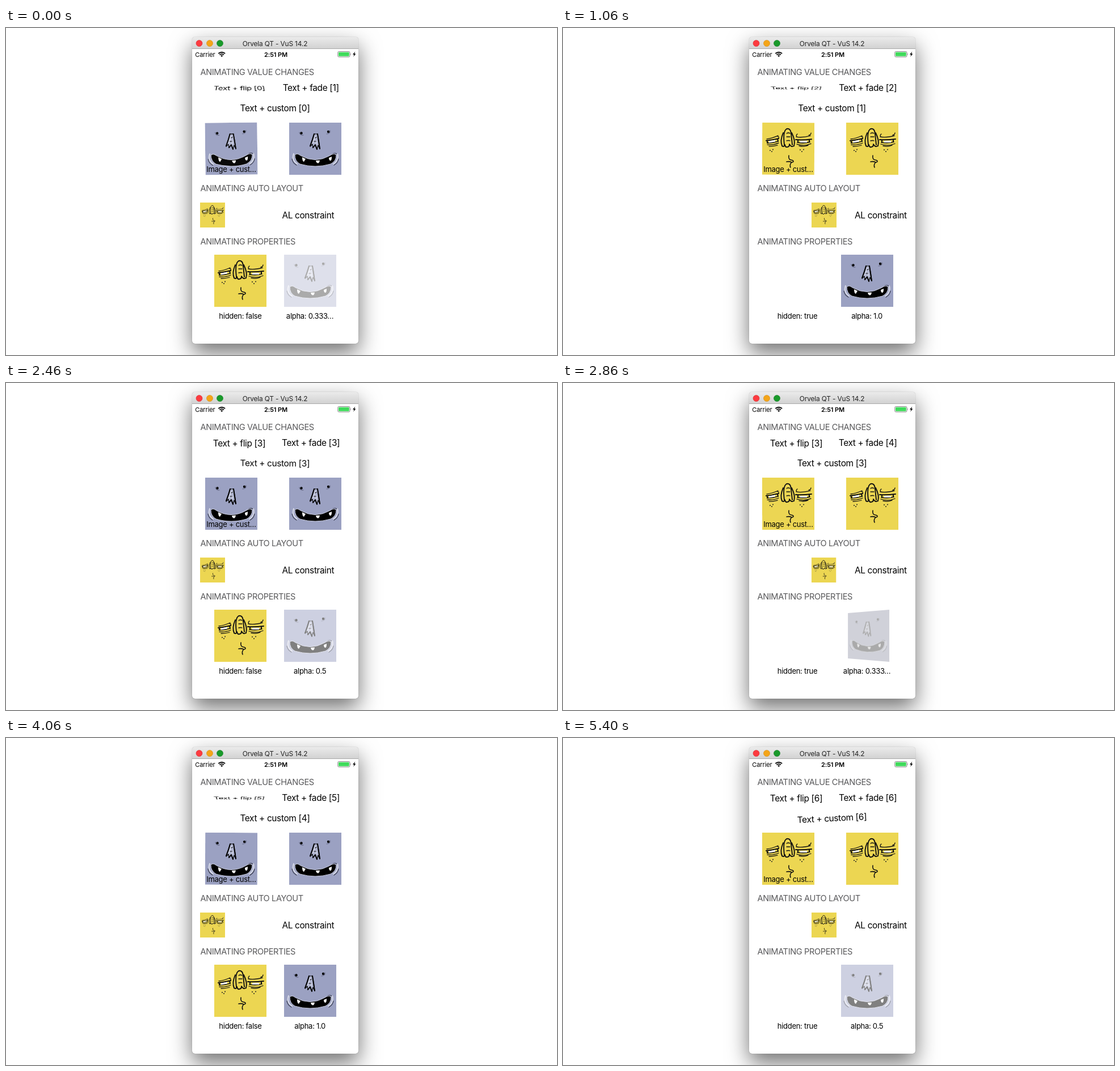
Write an HTML page that moves like this. It is 971x577 px and loops after 5.5 s.

```html
<!DOCTYPE html>
<html lang="en">
<head>
<meta charset="utf-8">
<title>Animated bindings</title>
<style>
html, body { margin: 0; width: 100%; height: 100%; overflow: hidden; background: #fff; }
body { position: relative; font-family: Inter, Roboto, sans-serif; color: #000; }
.box, .window, .bar { position: absolute; }
.window { left: 327.5px; top: 16px; width: 293.5px; height: 541px; border-radius: 5px; background: #fff;
  box-shadow: 0 0 1px rgba(0,0,0,.5), 0 16px 38px rgba(0,0,0,.56); }
.bar { left: 0; top: 0; width: 100%; height: 20px; border-radius: 5px 5px 0 0; border-bottom: 1px solid #aaa;
  background: linear-gradient(#ebebeb, #d2d2d2); }
.chrome { position: absolute; left: 0; top: 0; }
.text { display: flex; align-items: center; justify-content: center; white-space: pre; }
.body { font-size: 15.4px; letter-spacing: -.35px; }
.small { font-size: 13px; letter-spacing: -.28px; }
.head { font-size: 14.6px; letter-spacing: -.38px; color: #58585a; justify-content: flex-start; }
.title { font-size: 11.9px; letter-spacing: -.15px; color: #222; }
.status { font-size: 11px; letter-spacing: -.1px; }
.bold { font-weight: 600; }
.face svg { display: block; width: 100%; height: 100%; }
</style>
</head>
<body>
<svg width="0" height="0" style="position:absolute">
  <symbol id="purple" viewBox="0 0 92 92">
    <rect width="92" height="92" fill="#9ba1c2"/>
    <g fill="none" stroke-linecap="round" stroke-linejoin="round">
      <path d="M18 17q1 6 7 5M72 14q1 5-6 6" stroke="#666a86" stroke-width="1.2"/>
      <path d="M8 55Q4 66 14 73M85 55Q88 66 78 73" stroke="#d4d7e6" stroke-width="2.2"/>
      <path d="M5 64q1 7 8 11M87 64q-1 7-8 11M77 55q4-2 7 0" stroke="#34374a" stroke-width="1.2"/>
      <path d="M44 20Q40 33 37 42L41 38 42 44 46 39 49 47 51 40 54 46Q53 34 50 20Z" fill="#b0b5d0" stroke="#000" stroke-width="1.2"/>
      <path d="M50 20Q52 34 54 46M44 20Q41 31 37 41M42 44l4-5 3 8" stroke="#000" stroke-width="2"/>
      <path d="M43 33h5M45 27l3-1" stroke="#000" stroke-width="1.2"/>
      <path d="M42 36L46 24M48 37v-5" stroke="#e8eaf4" stroke-width="1"/>
      <path d="M10 57Q14 53 20 58 46 73 72 58 79 53 83 57 83 68 73 73 46 81 19 73 10 68 10 57Z" fill="#000" stroke="#c5c8da" stroke-width="1"/>
    </g>
    <circle cx="21.500" cy="18.500" r="2.2"/><circle cx="69" cy="16" r="2.2"/>
    <path d="M23 61l6 3-3 5q-3-1-3-8M47 67l7-.5q-1 5-3 5-3 0-4-4.500M70 62l5-2q0 7-2 7-3 0-3-5" fill="#fff"/>
  </symbol>
  <symbol id="yellow" viewBox="0 0 92 92">
    <rect width="92" height="92" fill="#ecd652"/>
    <g fill="none" stroke="#111" stroke-width="1.3" stroke-linecap="round" stroke-linejoin="round">
      <path d="M39 39Q36 15 43 11 50 9 51 20L53 39M37 18Q31 32 35 41M52 18Q59 32 56 41" stroke-width="1.9"/>
      <path d="M35 41q3 3 5-2 1 5 4 4 4 0 4-5 3 6 8 3" stroke-width="1.9"/>
      <path d="M43 19q3-2 6 0M43 25h6M43 32q4-1 6 0"/>
      <path d="M8 29Q17 28 28 23M9 39Q20 40 29 36M12 42q8 0 15-2M26 24q4 0 3 4"/>
      <path d="M60 25Q70 27 85 23M61 38q14 4 25-1M65 41q9 2 16-1M82 22q4-1 4-4M61 25q-2-3 1-5"/>
      <path d="M7 32Q18 31 29 28M59 30Q72 31 87 29" stroke-width="2"/>
      <path d="M9 36Q19 36 28 33M62 35Q74 37 84 34" stroke-width="1.6"/>
      <path d="M9 32v4M27 29l1 4M63 31v4M83 30v4" stroke-width="2"/>
      <path d="M47 58c-1 5 1 8 5 8 4 1 4 3 1 4M43 69q5-1 9 1-4 4-2 9" stroke-width="1.6"/>
    </g>
    <path d="M12 32.500l11-2v3l-11 2ZM67 32h12v3H67Z" fill="#fff"/>
    <g fill="#222"><circle cx="14" cy="49" r="1"/><circle cx="19" cy="47.500" r="1"/><circle cx="17" cy="51" r="1"/>
      <circle cx="67" cy="48" r="1"/><circle cx="73" cy="47.500" r="1"/><circle cx="70" cy="51" r="1"/></g>
  </symbol>
</svg>
<div class="window"><div class="bar"></div></div>
<svg class="chrome" width="971" height="577">
  <g stroke-width=".6">
    <circle cx="340.500" cy="27" r="5.500" fill="#fc3b40" stroke="#d9292e"/>
    <circle cx="359" cy="27" r="5.500" fill="#f4a519" stroke="#d58a0d"/>
    <circle cx="377" cy="27" r="5.500" fill="#199a2b" stroke="#0c7a1c"/>
  </g>
  <g fill="none" stroke="#000" stroke-width="1.900">
    <path d="M374.300 45q5.900-4.600 11.800 0M376.400 47.300q3.800-2.800 7.600 0"/>
  </g>
  <path d="M378 48.800q2.200-1.500 4.400 0l-2.200 2.200Z"/>
  <rect x="584.700" y="41.500" width="21.300" height="9.600" rx="2" fill="#fff" stroke="#777" stroke-width=".9"/>
  <rect x="586" y="42.800" width="18.700" height="7" rx="1" fill="#3fdb5b"/>
  <path d="M607 44.500q1.700 1.800 0 3.600Z" fill="#777"/>
  <path d="M615.300 41.500l-4.300 5.300h2.400l-1.200 4 4.300-5.400h-2.500Z"/>
</svg>
<script>
const TICKS = [-.44, .56, 1.56, 2.56, 3.56, 4.545], LOOP = 5.5;

function box(cls, cx, cy, w, h, html) {
  const el = document.createElement('div');
  el.className = 'box ' + cls;
  el.style.cssText = `left:${cx - w / 2}px;top:${cy - h / 2}px;width:${w}px;height:${h}px`;
  el.innerHTML = html;
  document.body.append(el);
  return el;
}
const text = (style, cx, cy, str = '') => box('text ' + style, cx, cy, 160, 20, str);

function face(cx, cy, size) {
  const el = box('face', cx, cy, size, size,
    '<svg viewBox="0 0 92 92"><use href="#yellow"/><rect width="92" height="92" opacity="0"/></svg>');
  el.use = el.querySelector('use');
  el.shade = el.querySelector('rect');
  return el;
}

text('title', 474, 27, 'Orvela QT - VuS 14.2');
text('status', 351, 46.5, 'Carrier');
text('status bold', 475.5, 46.5, '2:51 PM');
[['VALUE CHANGES', 78], ['AUTO LAYOUT', 283], ['PROPERTIES', 376.5]]
  .forEach(([name, y]) => text('head', 422.5, y, 'ANIMATING ' + name));

const flipText = text('body', 410.7, 105.5);
const fadeOld = text('body', 537.2, 105.5), fadeNew = text('body', 537.2, 105.5);
const customText = text('body', 474, 140.5);
const tickFace = face(397, 213, 92);
text('small', 397, 249, 'Image + cust…');
const flipFace = face(545, 213, 92);
const slideFace = face(364.2, 330, 44);
const slideText = text('body', 532.3, 330, 'AL constraint');
const hideFace = face(413, 445.5, 92), alphaFace = face(535.6, 445.5, 92);
const hideText = text('small', 413, 508), alphaText = text('small', 535.6, 508);
alphaFace.use.setAttribute('href', '#purple');

const clamp = v => Math.min(1, Math.max(0, v));

// cubic-bezier(.42, 0, .58, 1)
function ease(x) {
  x = clamp(x);
  let lo = 0, hi = 1, u = .5;
  for (let i = 0; i < 20; i++) {
    u = (lo + hi) / 2;
    const bx = 1.26 * u * (1 - u) ** 2 + 1.74 * u * u * (1 - u) + u ** 3;
    if (bx < x) lo = u; else hi = u;
  }
  return u * u * (3 - 2 * u);
}

// Underdamped spring running from 1 to 0
const spring = (t, freq, decay) =>
  Math.exp(-decay * t) * (Math.cos(freq * t) + decay / freq * Math.sin(freq * t));

// Turns the view half way round; returns true once the new side shows
function flip(el, axis, dir, half, progress) {
  const angle = 180 * progress - (progress < .5 ? 0 : 180);
  const depth = half * Math.sin(Math.abs(angle) * Math.PI / 180);
  el.style.transform = `perspective(320px) translateZ(${-depth}px) rotate${axis}(${angle * dir}deg)`;
  if (el.shade) el.shade.setAttribute('opacity', Math.abs(angle) / 90 * .78);
  return progress >= .5;
}

function swing(el, x, angle) {
  el.style.transform = `rotate(${x * angle}rad)`;
  el.style.opacity = clamp(1 - x);
}

const setFace = (el, n) => el.use.setAttribute('href', n % 2 ? '#purple' : '#yellow');
const alphaOf = n => 1 / ((n + 1) % 3 + 1);

function draw(t) {
  const n = TICKS.filter(start => start <= t).length;
  const p = t - TICKS[n - 1];

  const flipped = flip(flipText, 'X', 1, 10, ease((p - .335) / .285));
  flipText.textContent = `Text + flip [${flipped ? n : n - 1}]`;

  const fade = ease((p - .08) / .22);
  fadeOld.textContent = `Text + fade [${n - 1}]`;
  fadeNew.textContent = `Text + fade [${n}]`;
  fadeOld.style.opacity = 1 - fade;
  fadeNew.style.opacity = fade;

  const late = p < .67;
  customText.textContent = `Text + custom [${late ? n - 1 : n}]`;
  swing(customText, spring(late ? p + .33 : p - .67, 22.7, 8.7), .3);

  setFace(tickFace, n);
  swing(tickFace, spring(p, 17, 6.5), -.3);
  setFace(flipFace, flip(flipFace, 'X', 1, 46, ease(p / .245)) ? n : n - 1);

  const move = ease(p / .315), right = n % 2 ? 1 - move : move;
  slideFace.style.transform = `translateX(${96 * right}px)`;
  slideText.style.transform = `translateX(${27.6 * right}px)`;

  const turn = ease(p / .425);
  const hideTurned = flip(hideFace, 'X', -1, 46, turn);
  hideFace.style.visibility = (hideTurned ? n : n - 1) % 2 ? 'visible' : 'hidden';
  hideText.textContent = `hidden: ${n % 2 === 0}`;

  const alphaTurned = flip(alphaFace, 'Y', 1, 46, turn);
  alphaFace.style.opacity = alphaOf(alphaTurned ? n : n - 1);
  alphaText.textContent = 'alpha: ' + ['0.5', '0.333…', '1.0'][n % 3];
}

const begin = performance.now();
function frame() {
  draw((performance.now() - begin) / 1000 % LOOP);
  requestAnimationFrame(frame);
}
frame();
</script>
</body>
</html>
```
